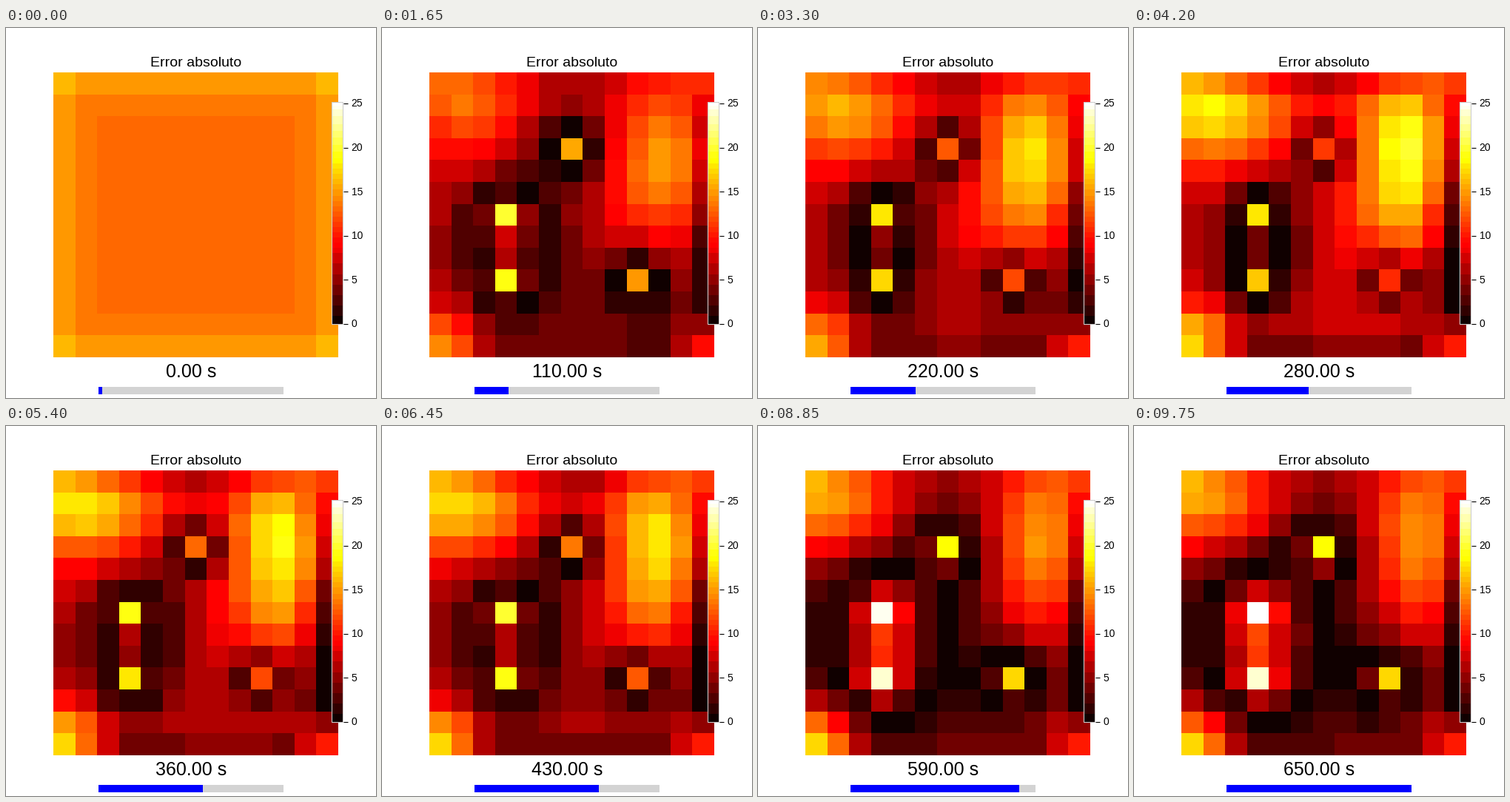
A matplotlib script that plays this animation: 500 by 500 pixels, repeating every 9900 ms.

```python
import numpy as np
import matplotlib
import matplotlib.pyplot as plt
from matplotlib.animation import FuncAnimation
from matplotlib.patches import Rectangle

plt.rcParams["font.family"] = "Liberation Sans"

N = 13
FRAMES = 66
STEP_MS = 150
VMAX = 25.13
Y, X = np.mgrid[:N, :N].astype(float)

HEATERS = [(6, 3), (3, 6), (3, 9), (9, 9)]  # column, row


def bump(x, y, height, sx, sy):
    return height * np.exp(-((X - x) / sx) ** 2 / 2 - ((Y - y) / sy) ** 2 / 2)


def plateau(u):
    return np.exp(-((u - 6) / 4.6) ** 6)


def initial_field():
    """Nearly flat, rising towards the rim and most in the corners."""
    dx, dy = np.minimum(X, N - 1 - X), np.minimum(Y, N - 1 - Y)
    return 13 + 1.65 * (0.36 ** np.minimum(dx, dy) + (dx + dy == 0))


def settled_field():
    """Warm lobes and cool valleys, with a sharp dip at every heater."""
    field = 4 + bump(0.3, 0.8, 11.5, 2.7, 1.8)    # upper left lobe
    field += bump(10.3, 2.6, 11, 1.8, 3.4)        # right lobe
    field += bump(0, 12, 13.5, 1.2, 1.2)          # corners
    field += bump(12, 12, 9, 0.8, 0.9)
    field += bump(12, 0, 3.5, 0.6, 0.6)
    field += bump(0, 0, 2, 0.6, 0.6)
    field += bump(3.2, 7.2, -9, 1.9, 2.4)         # valleys
    field += bump(6, 3.5, -2.5, 1.5, 1.5)
    field += bump(8, 9, -2.2, 1.8, 1.8)
    field += bump(12, 7, -6, 0.5, 4)
    for x, y in HEATERS:
        field -= 20.5 * np.exp(-1.35 * np.hypot(X - x, Y - y) ** 1.2)
    return field


def dome_mode():
    """Even rise of the inside, fading towards the rim."""
    across = 1 - 0.35 * np.exp(-X / 1.5) - 1 / (1 + np.exp(2.2 * (10.5 - X)))
    down = 1 - 0.8 * (np.exp(-Y / 1.1) + np.exp((Y - 12) / 1.1))
    return 7.2 * np.maximum(0, across + down - 1)


def early_mode():
    """Broad band across the middle rows, weaker near both sides."""
    sides = 4.4 * np.exp(-X / 1.8) + 2.8 * np.exp(-((X - 10.5) / 1.6) ** 2 / 2)
    band = np.exp(-np.abs((Y - 6.7) / 4.2) ** 4)
    return 0.9 - sides + (3 + 4 * np.exp(-X / 2.5)) * band


START, SETTLED = initial_field(), settled_field()
DOME, EARLY = dome_mode(), early_mode()
RISE = 2.2 * plateau(X) * plateau(Y)


def error_at(k):
    early = np.interp(k, [17, 28], [1, 0])
    rise = np.interp(k, [11, 17, 28], [0, 1, 0])
    dome = np.interp(k, [17, 28, 43, 53, 65], [0, 1, 0.66, 0, -0.06])
    field = SETTLED + early * EARLY + rise * RISE + dome * DOME
    mix = min(1, k / 11) ** 0.8
    return np.abs(START + mix * (field - START))


def banded(channel, step):
    out = np.floor(channel / step) * step + step / 2
    out[channel < 1] = 0
    out[channel >= 240] = 255
    return out


def colours(values):
    rgb = matplotlib.colormaps["hot"](np.clip(values / VMAX, 0, 1))[..., :3] * 255
    bands = [banded(rgb[..., i], s) for i, s in enumerate((32, 16, 32))]
    return np.stack(bands, axis=-1).astype(np.uint8)


fig = plt.figure(figsize=(5, 5), dpi=100, facecolor="white")
ax = fig.add_axes([0, 0, 1, 1])

image = ax.imshow(colours(START), extent=(64, 449, 445, 60),
                  interpolation="nearest", aspect="auto")
ramp = np.linspace(VMAX, 0, 300)[:, None]
ax.imshow(colours(ramp), extent=(440, 455, 400, 100),
          interpolation="nearest", aspect="auto", zorder=2)
ax.add_patch(Rectangle((440, 100), 15, 300, fill=False,
                       edgecolor="#cccccc", linewidth=0.8, zorder=3))

for value in range(0, 26, 5):
    y = 400 - value * 11.92
    ax.plot([456, 462], [y, y], color="black", linewidth=0.8,
            solid_capstyle="butt")
    ax.text(466.5, y + 4.5, str(value), fontsize=10, va="baseline")

ax.text(256.5, 52, "Error absoluto", fontsize=14, ha="center", va="baseline")
clock = ax.text(250.5, 472.5, "", fontsize=18, ha="center", va="baseline")

ax.add_patch(Rectangle((125, 485), 250, 10, color="#d3d3d3", linewidth=0))
progress = ax.add_patch(Rectangle((125, 485), 0, 10, color="#0000ff", linewidth=0))

ax.set_xlim(0, 500)
ax.set_ylim(500, 0)
ax.axis("off")


def draw(k):
    image.set_data(colours(error_at(k)))
    clock.set_text(f"{10 * k:.2f} s")
    progress.set_width(min(250, round((k + 1) * 250 / FRAMES + 1)))
    return image, clock, progress


anim = FuncAnimation(fig, draw, frames=FRAMES, interval=STEP_MS, repeat=True)
plt.show()
```
